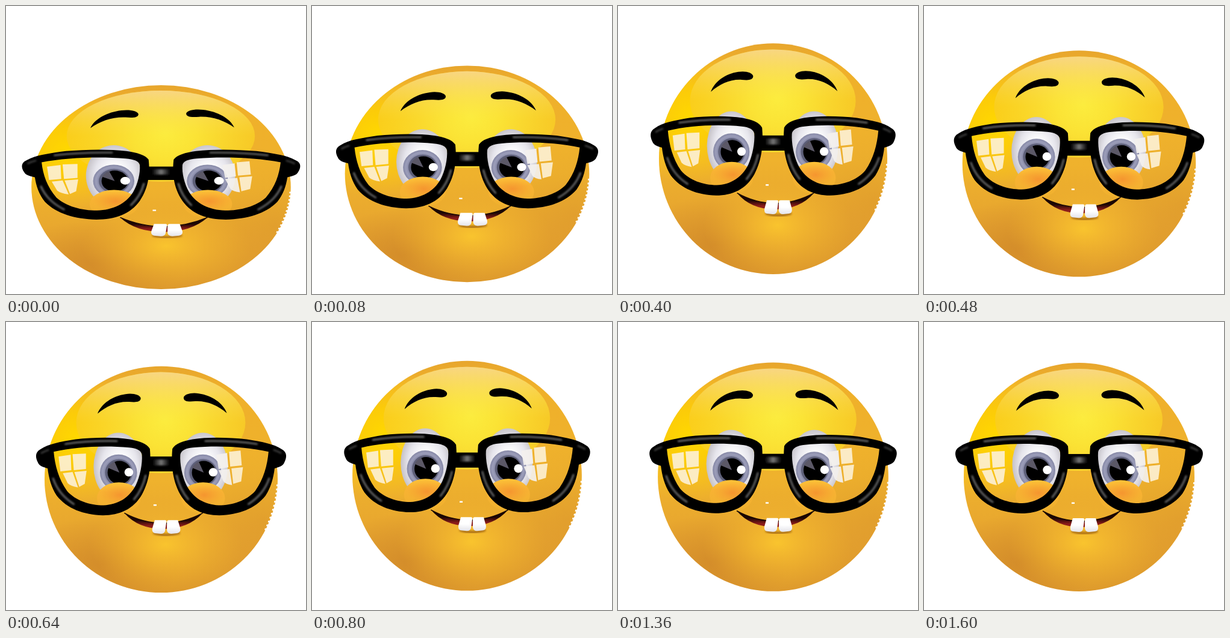
An HTML page for the animation above (1920 ms loop, 498 px wide and 480 px high).

```html
<!DOCTYPE html>
<html lang="en">
<head>
<meta charset="utf-8">
<title>Bouncing nerd face</title>
<style>
  html, body { margin: 0; width: 100%; height: 100%; overflow: hidden; background: #fff; }
  svg { display: block; width: 498px; height: 480px; }
</style>
</head>
<body>
<svg viewBox="0 0 498 480">
  <defs>
    <linearGradient id="skin" x1="0" y1="0" x2="0" y2="1">
      <stop offset="0" stop-color="#e6a42e"/>
      <stop offset=".12" stop-color="#efb02a"/>
      <stop offset=".5" stop-color="#efb22d"/>
      <stop offset=".75" stop-color="#e6a42f"/>
      <stop offset="1" stop-color="#dc982c"/>
    </linearGradient>
    <radialGradient id="sun">
      <stop offset="0" stop-color="#ffd800"/>
      <stop offset=".4" stop-color="#ffd200" stop-opacity=".8"/>
      <stop offset="1" stop-color="#fbc81c" stop-opacity="0"/>
    </radialGradient>
    <radialGradient id="glow">
      <stop offset="0" stop-color="#f9c42e"/>
      <stop offset=".35" stop-color="#f4b92e" stop-opacity=".75"/>
      <stop offset="1" stop-color="#eeb02e" stop-opacity="0"/>
    </radialGradient>
    <radialGradient id="shade">
      <stop offset="0" stop-color="#d08829" stop-opacity=".8"/>
      <stop offset="1" stop-color="#d08829" stop-opacity="0"/>
    </radialGradient>
    <radialGradient id="shine" gradientUnits="userSpaceOnUse" cx="264" cy="158" r="150">
      <stop offset="0" stop-color="#fcec3e"/>
      <stop offset=".3" stop-color="#fbe335"/>
      <stop offset="1" stop-color="#f9cc22" stop-opacity=".75"/>
    </radialGradient>
    <linearGradient id="gloss" x1="0" y1="0" x2="0" y2="1">
      <stop offset="0" stop-color="#f8d68c" stop-opacity=".9"/>
      <stop offset=".3" stop-color="#fadc70" stop-opacity=".3"/>
      <stop offset=".5" stop-color="#fae050" stop-opacity="0"/>
    </linearGradient>
    <radialGradient id="ball" cx=".52" cy=".5" r=".52">
      <stop offset=".3" stop-color="#fff"/>
      <stop offset=".7" stop-color="#e6e5ec"/>
      <stop offset="1" stop-color="#c5c2c8"/>
    </radialGradient>
    <radialGradient id="iris">
      <stop offset=".7" stop-color="#8385a3"/>
      <stop offset=".85" stop-color="#9c9eba"/>
      <stop offset="1" stop-color="#8587a5"/>
    </radialGradient>
    <linearGradient id="lid" x1="0" y1="0" x2="0" y2="1">
      <stop offset="0" stop-color="#fdc238"/>
      <stop offset=".3" stop-color="#f8b233"/>
      <stop offset="1" stop-color="#efb12e"/>
    </linearGradient>
    <radialGradient id="blush">
      <stop offset="0" stop-color="#f5922f" stop-opacity=".9"/>
      <stop offset="1" stop-color="#f5a030" stop-opacity="0"/>
    </radialGradient>
    <linearGradient id="bridge" x1="0" y1="0" x2="1" y2="0">
      <stop offset=".15" stop-color="#000"/>
      <stop offset=".5" stop-color="#777"/>
      <stop offset=".85" stop-color="#000"/>
    </linearGradient>
    <linearGradient id="tooth" x1="0" y1="0" x2="0" y2="1">
      <stop offset=".5" stop-color="#fff"/>
      <stop offset="1" stop-color="#e3e3ea"/>
    </linearGradient>
    <linearGradient id="lips" x1="0" y1="0" x2="0" y2="1">
      <stop offset=".45" stop-color="#1c0604"/>
      <stop offset=".8" stop-color="#8c1d1a"/>
    </linearGradient>
    <filter id="soft" x="-30%" y="-30%" width="160%" height="160%"><feGaussianBlur stdDeviation="1.6"/></filter>
    <clipPath id="head"><ellipse cx="257.5" cy="258.5" rx="191.5" ry="190.5"/></clipPath>

    <g id="eye">
      <ellipse cx="187.500" cy="237" rx="41" ry="57" fill="url(#ball)"/>
      <circle cx="187.500" cy="247" r="30.500" fill="url(#iris)"/>
      <circle cx="188" cy="247" r="22.500" fill="#5d5f78"/>
      <circle cx="189" cy="247" r="19.500"/>
      <path d="M189 247L170 239A20 20 0 0 1 181 229Z" fill="#5b5867"/>
      <circle cx="204.500" cy="246.500" r="7.200" fill="#fff"/>
      <ellipse cx="188" cy="290" rx="36" ry="26.500" fill="url(#lid)"/>
      <ellipse cx="190" cy="285" rx="33" ry="19" fill="url(#blush)"/>
    </g>

    <g id="rim">
      <path fill-rule="evenodd" d="M59 208C66 203 74 200 82 198C93 195 105 193 117 191
        C145 188 180 187 206 191C222 194 234 198 239 207C241 230 240 258 226 284
        C212 309 189 319 162 319C130 318 103 308 86 286C77 272 73 256 71 240
        C64 238 57 236 55 230C51 222 50 213 59 208Z
        M81 212C83 235 89 258 103 278C117 294 140 302 163 302C186 301 205 290 216 268
        C223 253 227 232 226 217C225 210 217 206 205 205C167 201 118 203 81 212Z"/>
      <g fill="none" stroke="#aaa" stroke-linecap="round" filter="url(#soft)">
        <path d="M100 199Q140 193 185 194" stroke-width="2.500" opacity=".7"/>
        <path d="M80 257Q89 284 114 300" stroke-width="3" opacity=".6"/>
        <path d="M232 252Q227 275 213 292" stroke-width="3" opacity=".6"/>
        <path d="M61 214Q66 211 72 209" stroke-width="3" opacity=".35"/>
      </g>
    </g>
  </defs>

  <g id="face">
    <g clip-path="url(#head)">
      <rect x="60" y="60" width="400" height="400" fill="url(#skin)"/>
      <ellipse cx="120" cy="190" rx="120" ry="110" fill="url(#sun)"/>
      <ellipse cx="160" cy="400" rx="130" ry="80" fill="url(#shade)"/>
      <circle cx="425" cy="330" r="120" fill="url(#shade)" opacity=".35"/>
      <ellipse cx="265" cy="368" rx="125" ry="80" fill="url(#glow)"/>
    </g>
    <ellipse cx="257" cy="163" rx="139" ry="85" fill="url(#shine)"/>
    <ellipse cx="257" cy="163" rx="139" ry="85" fill="url(#gloss)"/>
    <path d="M449 267Q447 306 429 344" fill="none" stroke="#fff" stroke-width="4" stroke-dasharray="3 4"/>

    <path id="brow" d="M153 148C159 131 178 118 199 115C211 113 223 116 224 122C224 129 215 129 205 128C185 127 168 135 153 148Z"/>
    <use href="#brow" transform="matrix(-1 0 0 1 518.500 -1)"/>

    <use href="#eye"/>
    <use href="#eye" x="138.500"/>

    <path d="M197 315Q228 332 261 332Q294 332 326 315Q302 342 261 342Q220 342 197 315Z" fill="url(#lips)"/>
    <path d="M197 315Q228 332 261 332Q294 332 326 315" fill="none" stroke="#170502" stroke-width="1.500"/>
    <path d="M245 348Q264 356 288 348" fill="none" stroke="#94590f" stroke-width="5" filter="url(#soft)" opacity=".7"/>
    <g fill="url(#tooth)">
      <path d="M247 327H264Q267 327 266 331L264 345Q263 350 257 350L247 349Q242 348 243 341Z"/>
      <path d="M270 327H285L289 341Q290 348 284 349L274 350Q268 350 267 344V331Q267 327 270 327Z"/>
    </g>

    <g opacity=".92">
      <path fill="#fdf0d2" d="M89 220L109 217L110 243L92 245ZM112 216L134 215V241L114 243ZM96 248L112 246L121 272Q109 270 104 265ZM115 246L135 244L132 266L123 271Z"/>
      <path fill="#fdf0d2" d="M369 212L388 210L390 235L371 237ZM373 240L392 238L389 262L376 266Z"/>
      <path fill="#f4f1ee" d="M348 217L366 214L368 238L352 241ZM352 243L370 241L374 268Q364 267 360 262Z"/>
    </g>

    <rect x="237" y="220" width="41" height="25"/>
    <rect x="239" y="225" width="37" height="10" fill="url(#bridge)" filter="url(#soft)"/>
    <use href="#rim"/>
    <use href="#rim" transform="matrix(-1 0 0 1 515 0)"/>
    <rect x="245" y="300.500" width="5" height="2.500" fill="#fff"/>
  </g>
</svg>
<script>
  const LOOP = 1920, STEP = 80, CENTER = 257.5, BOTTOM = 449;
  const holds = [1600, 1360, 1040, 960, 800]; // late poses that stay longer than one step
  const face = document.getElementById('face');

  // Damped spring: 1 is fully squashed, 0 is at rest.
  const squash = t => 2 ** (-t / 205) * Math.cos(2 * Math.PI * t / 576);

  function draw(now) {
    const t = now % LOOP;
    const pose = holds.find(h => t >= h) ?? Math.floor(t / STEP) * STEP;
    const s = squash(pose);
    const sx = 1.124 ** s, sy = 1 - 0.1076 * s;
    face.setAttribute('transform',
      `translate(${CENTER} ${BOTTOM + 23 * s}) scale(${sx} ${sy}) translate(${-CENTER} ${-BOTTOM})`);
    requestAnimationFrame(() => draw(performance.now() - start));
  }

  const start = performance.now();
  draw(0);
</script>
</body>
</html>
```
